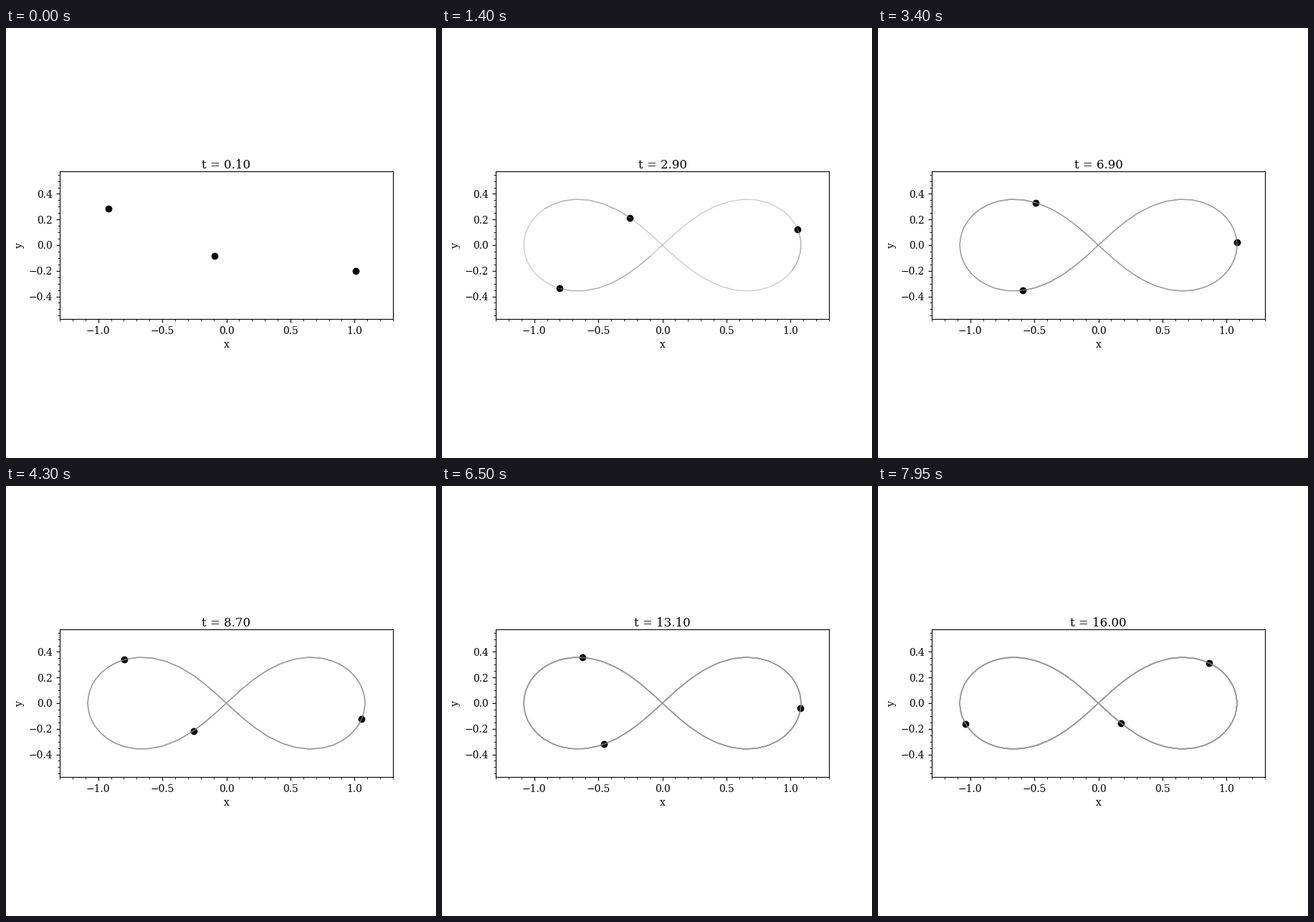
A matplotlib script that plays this animation: 600 by 600 pixels, repeating every 8 s.

```python
import numpy as np
import matplotlib.pyplot as plt
from matplotlib.animation import FuncAnimation

FRAMES = 160
INTERVAL = 50
DT = 0.1
SUBSTEPS = 40

plt.rcParams.update({
    "font.family": "DejaVu Serif",
    "font.size": 10,
    "xtick.minor.visible": True,
    "ytick.minor.visible": True,
    "axes.titlepad": 3,
})


def accel(pos):
    """Gravity between three unit masses (G = 1)."""
    diff = pos[None, :, :] - pos[:, None, :]
    dist = np.sqrt((diff ** 2).sum(axis=2)) + np.eye(3)
    return (diff / dist[:, :, None] ** 3).sum(axis=1)


def simulate():
    """Positions on the figure-eight orbit at DT, 2 DT, ..., FRAMES * DT."""
    start = np.array([0.97000436, -0.24308753])
    speed = np.array([-0.93240737, -0.86473146])
    pos = np.array([start, -start, [0.0, 0.0]])
    vel = np.array([-speed / 2, -speed / 2, speed])
    h = DT / SUBSTEPS
    acc = accel(pos)
    path = []
    for _ in range(FRAMES):
        for _ in range(SUBSTEPS):
            vel = vel + acc * h / 2
            pos = pos + vel * h
            acc = accel(pos)
            vel = vel + acc * h / 2
        path.append(pos)
    return np.array(path)


path = simulate()

fig, ax = plt.subplots(figsize=(6, 6), dpi=100)
ax.set_aspect("equal")
ax.set_xlim(-1.3, 1.3)
ax.set_ylim(-0.575, 0.575)
ax.set_xlabel("x")
ax.set_ylabel("y")
title = ax.set_title("")

bodies = ax.scatter(*path[0].T, color="black")
trails = [ax.plot([], [], color="gray", alpha=0.4, lw=1)[0] for _ in range(3)]


def update(i):
    bodies.set_offsets(path[i])
    for k, trail in enumerate(trails):
        trail.set_data(path[:i + 1, k, 0], path[:i + 1, k, 1])
    title.set_text(f"t = {(i + 1) * DT:.2f}")
    return [bodies, title, *trails]


anim = FuncAnimation(fig, update, frames=FRAMES, interval=INTERVAL,
                     init_func=lambda: update(0), repeat=True, repeat_delay=0)
plt.show()
```
